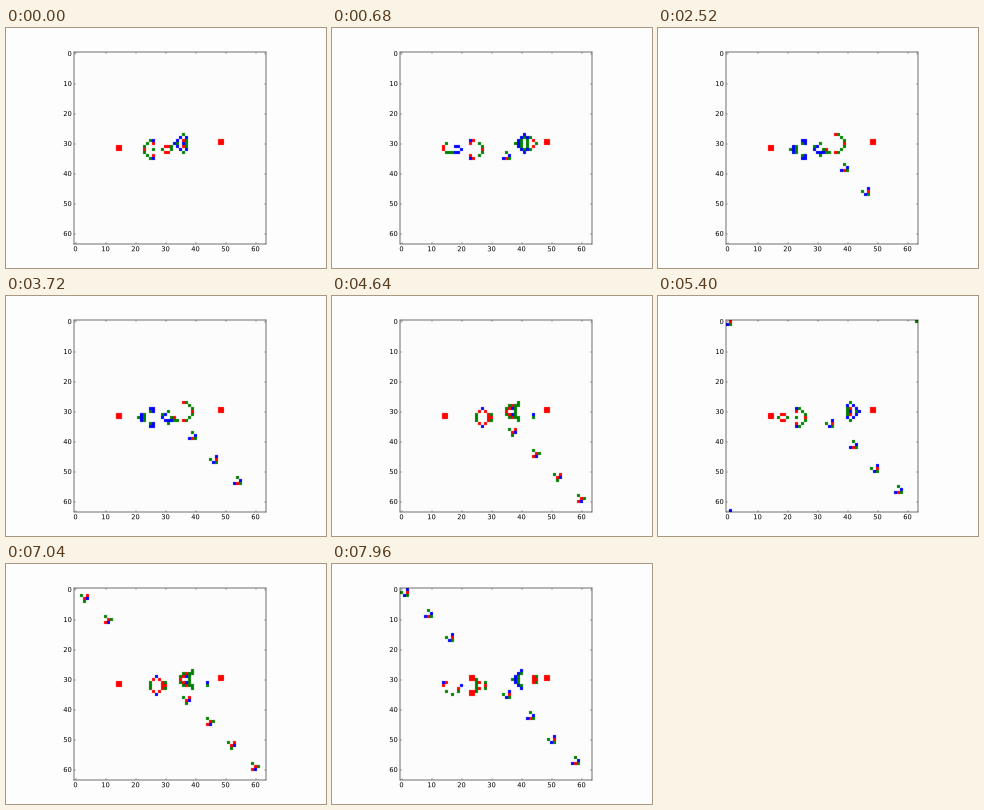
Animation of 320 by 240 pixels, one loop 8 s. Source, as a matplotlib script:

```python
import numpy as np
import matplotlib.pyplot as plt
from matplotlib.animation import FuncAnimation
from matplotlib.colors import to_rgb
from matplotlib.patheffects import Normal

SIZE = 64
CELL = 3
FRAMES = 200
WARMUP = 2
SOFT = 0.08
PAPER = "#fdfdfd"
DEAD, BORN, TWO, THREE = range(4)
COLORS = np.array([to_rgb(c) for c in (PAPER, "green", "blue", "red")])


def block(grid, x, y):
    grid[y:y + 2, x:x + 2] = BORN


def mirrored(grid, x, y, columns):
    """Fill a shape symmetric about row y; columns go outwards from it."""
    for dy, cols in enumerate(columns):
        for dx in cols:
            grid[[y - dy, y + dy], x + dx] = BORN


def glider_gun():
    grid = np.zeros((SIZE, SIZE), dtype=int)
    block(grid, 14, 31)
    block(grid, 48, 29)
    mirrored(grid, 24, 32, [(0, 4, 6, 7), (0, 6), (1, 5), (2, 3)])
    mirrored(grid, 34, 30, [(0, 1), (0, 1), (2, 4), (4,)])
    return grid


def step(grid):
    """One generation on a torus; the state tells how a cell came to live."""
    alive = grid > DEAD
    count = sum(
        np.roll(alive.astype(int), (dy, dx), (0, 1))
        for dy in (-1, 0, 1) for dx in (-1, 0, 1) if dy or dx
    )
    new = np.zeros_like(grid)
    new[~alive & (count == 3)] = BORN
    new[alive & (count == 2)] = TWO
    new[alive & (count == 3)] = THREE
    return new


def paint(grid):
    """Colour the cells at pixel size, with slightly soft edges."""
    rgb = COLORS[grid].repeat(CELL, axis=0).repeat(CELL, axis=1)
    p = np.pad(rgb, ((1, 1), (1, 1), (0, 0)), mode="edge")
    p = (1 - 2 * SOFT) * p[1:-1] + SOFT * (p[:-2] + p[2:])
    p = (1 - 2 * SOFT) * p[:, 1:-1] + SOFT * (p[:, :-2] + p[:, 2:])
    return p.clip(0, 1)


grid = glider_gun()
for _ in range(WARMUP):
    grid = step(grid)
history = [grid]
while len(history) < FRAMES:
    history.append(step(history[-1]))

plt.rcParams.update({
    "font.family": "DejaVu Sans",
    "font.size": 12,
    "axes.linewidth": 1.0,
    "savefig.dpi": "figure",
    "savefig.facecolor": PAPER,
})

fig = plt.figure(figsize=(8, 6), dpi=40, facecolor=PAPER)
ax = fig.add_axes([0.2125, 0.1, 0.6, 0.8], facecolor=PAPER)
edge = SIZE - 0.5
image = ax.imshow(paint(history[0]), interpolation="nearest",
                  extent=(-0.5, edge, edge, -0.5))
ax.set_xticks(range(0, SIZE, 10))
ax.set_yticks(range(0, SIZE, 10))
ax.tick_params(direction="in", top=True, right=True,
               length=4, width=0.5, pad=4, labelsize=12)
for spine in ax.spines.values():
    spine.set_snap(False)
# outlines place the small digits more finely than pixel glyphs
for label in ax.get_xticklabels() + ax.get_yticklabels():
    label.set_path_effects([Normal()])


def draw(i):
    image.set_data(paint(history[i]))
    return [image]


def reset():
    return draw(0)


anim = FuncAnimation(fig, draw, frames=FRAMES, init_func=reset,
                     interval=40, repeat=True, repeat_delay=0, blit=False)
plt.show()
```
